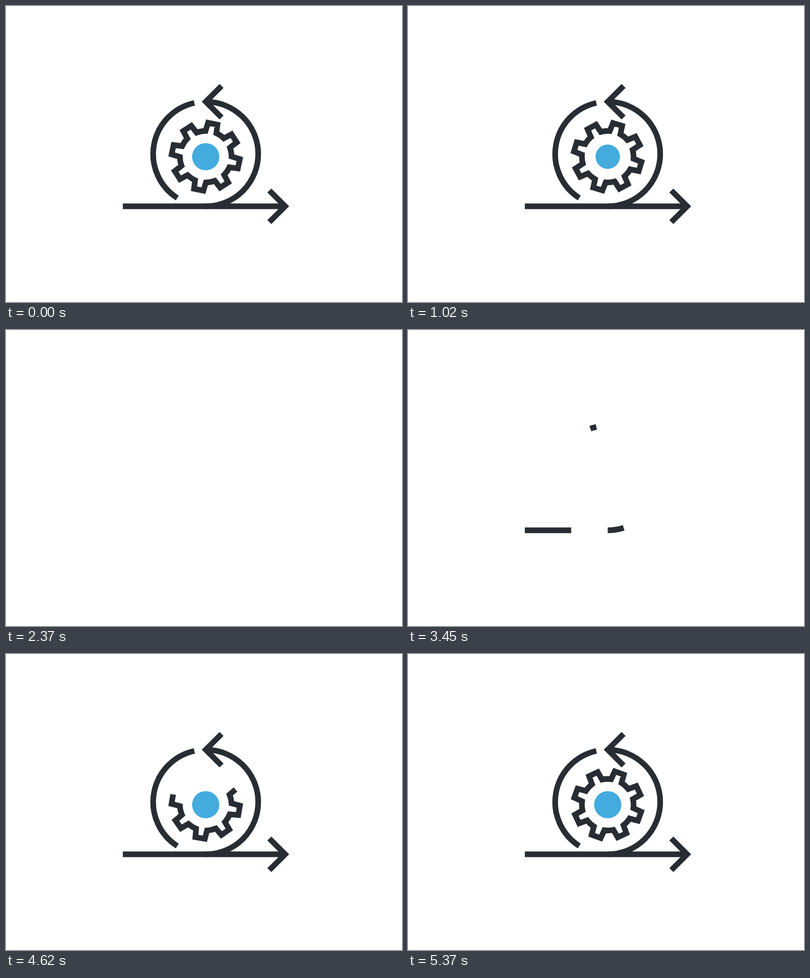
These frames come from a looping animation (800 by 600 pixels, 5400 ms). An HTML page:

```html
<!DOCTYPE html>
<html lang="en">
<head>
<meta charset="utf-8">
<title>Gear cycle</title>
<style>
  html, body { margin: 0; width: 100%; height: 100%; overflow: hidden; background: #fff; }
  svg { display: block; width: 100vw; height: 100vh; }
  path { fill: none; stroke: #272d33; stroke-width: 11.4; stroke-miterlimit: 10; }
</style>
</head>
<body>
<svg viewBox="0 0 800 600">
  <path id="line" pathLength="1" d="M236 406H564"/>
  <path id="loop" pathLength="1" d="M403.5 406A106 106 0 0 0 403.5 194"/>
  <path id="arc" pathLength="1" d="M380.5 196.5A106 106 0 0 0 346 389.2"/>
  <path id="headRight" pathLength="1" d="M532 374L564 406L532 438"/>
  <path id="headLeft" pathLength="1" d="M435.5 162L403.5 194L435.5 226"/>
  <path id="gear" pathLength="1"/>
  <circle id="hub" cx="403.5" cy="305.5" r="27.5" fill="#43abde"/>
</svg>
<script>
const LOOP = 5400, STEP = 30, FIRST = 3000;
const CX = 403.5, CY = 305.5;
const el = id => document.getElementById(id);

// Time axis runs from FIRST to FIRST + LOOP: [in start, in end, out start, out end]
const parts = {
  line: [3270, 3780, 7130, 7745],
  loop: [3290, 4115, 7130, 7745],
  arc: [3390, 3830, 6870, 7290],
  gear: [3820, 5325, 6885, 7650],
  headRight: [3480, 3825, 7360, 7750],
  headLeft: [3790, 4130, 7360, 7750],
  hub: [3700, 4110, 6330, 6780]
};
const spin = { from: 3800, span: 3940, turn: -720 };

const clamp = x => Math.min(1, Math.max(0, x));
const smooth = x => x * x * (3 - 2 * x);

// Cubic bezier (x1, 0, x2, 1)
function ease(x, x1, x2) {
  if (x <= 0 || x >= 1) return clamp(x);
  let lo = 0, hi = 1;
  for (let i = 0; i < 30; i++) {
    const u = (lo + hi) / 2, v = 1 - u;
    if (3 * v * v * u * x1 + 3 * v * u * u * x2 + u * u * u < x) lo = u;
    else hi = u;
  }
  return smooth(lo);
}

function gearPath() {
  const cog = [[68.4, 9.7], [68.4, -9.7], [51, -11.2]];
  const place = ([x, y], tooth) => {
    const a = -tooth * Math.PI / 4, c = Math.cos(a), s = Math.sin(a);
    return (x * c - y * s).toFixed(3) + " " + (x * s + y * c).toFixed(3);
  };
  let d = "";
  for (let k = 0; k < 8; k++) {
    d += (k ? "L" : "M") + cog.map(p => place(p, k)).join("L");
    d += "A52.2 52.2 0 0 0 " + place([51, 11.2], k + 1);
  }
  return d + "Z";
}

function trim(node, a, b) {
  const empty = b - a < 0.0005;
  node.style.visibility = empty ? "hidden" : "visible";
  const whole = a <= 0 && b >= 1;
  node.setAttribute("stroke-dasharray", whole || empty ? "none" : `0 ${a} ${b - a} 2`);
}

function draw(ms) {
  let t = Math.floor((ms % LOOP) / STEP) * STEP;
  if (t < FIRST) t += LOOP;

  for (const id in parts) {
    const [a, b, c, d] = parts[id];
    const x = clamp((t - a) / (b - a));
    const shown = id === "gear" ? ease(x, 1 / 6, 2 / 3) : smooth(x);
    const gone = smooth(clamp((t - c) / (d - c)));
    if (id === "hub") {
      el(id).setAttribute("r", 27.5 * (shown - gone));
    } else if (id.startsWith("head")) {
      const half = (shown - gone) / 2;
      trim(el(id), 0.5 - half, 0.5 + half);
    } else {
      trim(el(id), gone, shown);
    }
  }

  const angle = spin.turn * ease((t - spin.from) / spin.span, 1 / 6, 1 / 2);
  el("gear").setAttribute("transform", `translate(${CX} ${CY}) rotate(${angle})`);
}

el("gear").setAttribute("d", gearPath());
const start = performance.now();
function tick() {
  draw(performance.now() - start);
  requestAnimationFrame(tick);
}
tick();
</script>
</body>
</html>
```
